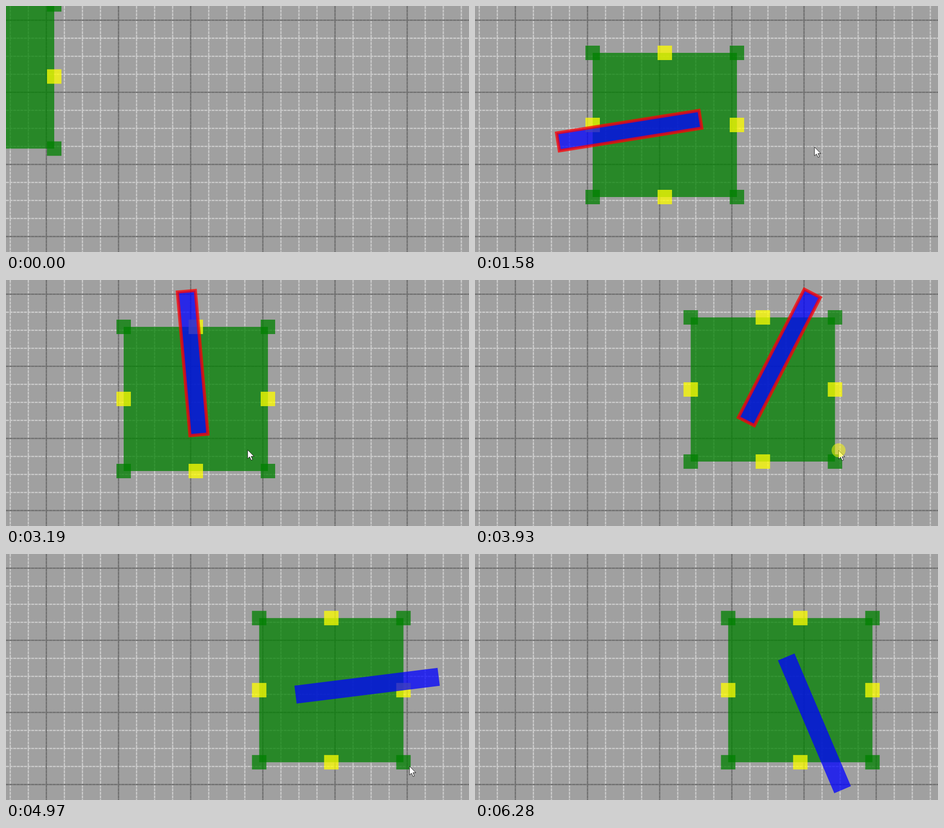
An HTML page with a canvas for the animation above (6350 ms loop, 1027 by 546 pixels).

```html
<!DOCTYPE html>
<html lang="en">
<head>
<meta charset="utf-8">
<title>Dragging a square with a rotating bar</title>
<style>
  html, body { margin: 0; width: 100%; height: 100%; overflow: hidden; background: #a0a0a0; }
  canvas { display: block; }
</style>
</head>
<body>
<canvas id="stage" width="1027" height="546"></canvas>
<script>
const W = 1027, H = 546, LOOP = 6350, STEP = 69, LAST_STEP = 91;
const ctx = document.getElementById('stage').getContext('2d');

const GREEN = 'rgba(0,128,0,.75)';
const YELLOW = 'rgba(255,255,0,.75)';
const BLUE = 'rgba(0,0,255,.75)';
const RED = 'rgba(255,0,0,.75)';

// Turning points of the pointer [step, x, y] and of the bar's speed [step, degrees]
const pointerPath = [
  [0, -135, 147.5], [10, 188, 231], [17, 339, 255], [23, 753, 313], [27, 884, 340], [46, 536, 377],
  [48, 589, 399], [57, 806.5, 378], [61, 889.6, 437.2], [72, 895, 471], [80, 885, 548]
];
const barTurn = [[0, 88], [20, 159.2], [46, 265], [57, 297.2], [72, 352.9], [91, 427]];

// Two drags: the square keeps a fixed offset to the pointer while it is held
const drags = [
  { from: 0, to: 17, grabX: -82, grabY: -9 },
  { from: 48, to: 61, grabX: 168, grabY: 135 }
];

const within = (step, from, to) => step >= from && step <= to;

// Monotone cubic interpolation of one column of a key list
function sample(keys, step, column) {
  const last = keys.length - 1;
  if (step >= keys[last][0]) return keys[last][column];
  const slope = i => (keys[i + 1][column] - keys[i][column]) / (keys[i + 1][0] - keys[i][0]);
  const tangent = i => {
    if (i === 0) return slope(0);
    if (i === last) return slope(last - 1);
    const a = slope(i - 1), b = slope(i);
    return a * b <= 0 ? 0 : 2 * a * b / (a + b);
  };
  let i = 0;
  while (step >= keys[i + 1][0]) i++;
  const span = keys[i + 1][0] - keys[i][0];
  const u = (step - keys[i][0]) / span, v = 1 - u;
  return keys[i][column] * v * v * (1 + 2 * u) + keys[i + 1][column] * u * u * (3 - 2 * u)
    + span * u * v * (tangent(i) * v - tangent(i + 1) * u);
}

const pointerAt = step => ({ x: sample(pointerPath, step, 1), y: sample(pointerPath, step, 2) });

function squareAt(step) {
  const drag = drags.findLast(d => step >= d.from);
  const { x, y } = pointerAt(Math.min(step, drag.to));
  return { x: x - drag.grabX, y: y - drag.grabY };
}

function line(x1, y1, x2, y2) {
  ctx.beginPath();
  ctx.moveTo(x1, y1);
  ctx.lineTo(x2, y2);
  ctx.stroke();
}

function gridLines(major, color, width, dash) {
  ctx.strokeStyle = color;
  ctx.lineWidth = width;
  ctx.setLineDash(dash);
  for (let i = 0; i < 26; i++) {
    const x = 9.5 + 40.02 * i, y = 31.5 + 40.02 * i;
    if ((i % 4 === 2) === major) line(x, 0, x, H);
    if ((i % 4 === 0) === major) line(0, y, W, y);
  }
}

function drawGrid() {
  ctx.fillStyle = '#a0a0a0';
  ctx.fillRect(0, 0, W, H);
  gridLines(false, '#cacaca', 2.8, [6.5, 1.5]);
  gridLines(true, '#808080', 3, []);
  gridLines(true, '#707070', 2.4, [6, 2]);
  ctx.setLineDash([]);
}

function box(x, y, size, color) {
  ctx.fillStyle = color;
  ctx.fillRect(x - size / 2, y - size / 2, size, size);
}

function drawSquare() {
  box(0, 0, 320, GREEN);
  for (const i of [-1, 0, 1]) {
    for (const j of [-1, 0, 1]) {
      if (i || j) box(160 * i, 160 * j, 32, i && j ? GREEN : YELLOW);
    }
  }
}

function drawBar(degrees, outlined) {
  ctx.rotate(degrees * Math.PI / 180);
  ctx.fillStyle = BLUE;
  ctx.fillRect(-80, -20, 320, 40);
  if (outlined) {
    ctx.strokeStyle = RED;
    ctx.lineWidth = 7;
    ctx.strokeRect(-80, -20, 320, 40);
  }
}

const arrow = new Path2D('M0 0V19.5L4.5 15.5L8 23L11 21.7L7.8 14.4H14Z');

function drawPointer(pressed) {
  ctx.fillStyle = '#fff';
  ctx.strokeStyle = '#111';
  ctx.lineWidth = 1;
  ctx.fill(arrow);
  ctx.stroke(arrow);
  if (pressed) {
    ctx.fillStyle = 'rgba(255,255,0,.5)';
    ctx.beginPath();
    ctx.arc(0, 0, 15.5, 0, 2 * Math.PI);
    ctx.fill();
  }
}

function drawAt({ x, y }, draw) {
  ctx.save();
  ctx.translate(x, y);
  draw();
  ctx.restore();
}

function render() {
  // The motion advances in discrete steps
  const step = Math.min(LAST_STEP, Math.floor((performance.now() % LOOP + 22) / STEP));
  const pressed = drags.some(d => within(step, d.from, d.to));
  const outlined = within(step, 21, 26) || within(step, 34, 62);
  drawGrid();
  drawAt(squareAt(step), () => {
    drawSquare();
    drawBar(sample(barTurn, step, 1), outlined);
  });
  drawAt(pointerAt(step), () => drawPointer(pressed));
  requestAnimationFrame(render);
}
render();
</script>
</body>
</html>
```
